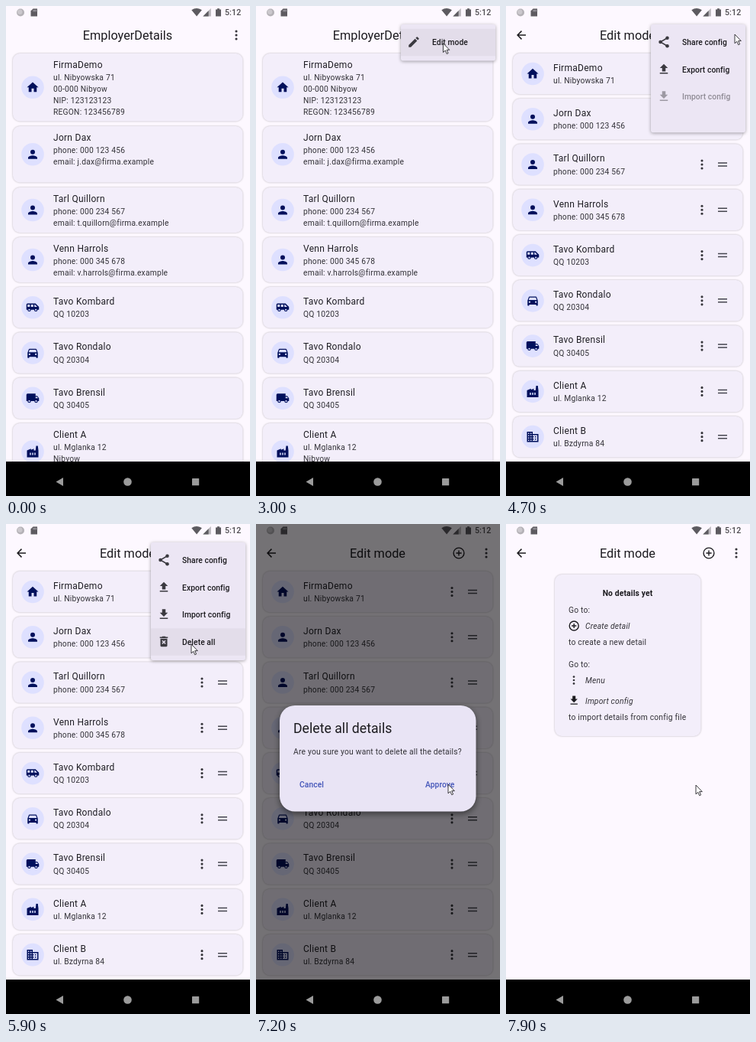
Animation, 320 px wide and 640 px high, one loop 8 s. Source, as an HTML page:

```html
<!DOCTYPE html>
<html lang="en">
<head>
<meta charset="utf-8">
<title>Details list</title>
<style>
  html, body { margin: 0; width: 100%; height: 100%; overflow: hidden; background: #fdf8ff; }
  svg { display: block; width: 100%; height: 100%; }
  text { font-family: Roboto, "Open Sans", sans-serif; font-size: 10.3px; letter-spacing: .2px; fill: #333238; white-space: pre; }
  .title { font-size: 12px; letter-spacing: .28px; fill: #1f1e24; }
  .bar { font-size: 16.3px; letter-spacing: 0; fill: #1c1b1f; text-anchor: middle; }
  .head { font-size: 17.7px; letter-spacing: 0; fill: #1c1b1f; }
  .label { font-weight: 500; letter-spacing: .06px; fill: #1c1b1f; }
  .button { font-weight: 500; letter-spacing: .06px; fill: #4355b9; }
  .bold { font-weight: 700; letter-spacing: .15px; fill: #1c1b1f; text-anchor: middle; }
  .italic { font-style: italic; }
  .clock { font-size: 10.6px; font-weight: 500; letter-spacing: .1px; fill: #4c4a4e; }
  .card { fill: #f3eefa; filter: drop-shadow(0 .8px .8px rgba(0, 0, 0, .27)); }
  .menu { fill: #ece6f4; filter: drop-shadow(0 1.5px 2px rgba(0, 0, 0, .35)); }
  .dialog { fill: #e9e4f5; filter: drop-shadow(0 3px 4px rgba(0, 0, 0, .5)); }
</style>
</head>
<body>
<svg id="stage" viewBox="0 0 320 640"></svg>
<script>
const LOOP = 8000, STEP = 100;
const NS = 'http://www.w3.org/2000/svg';
const stage = document.getElementById('stage');

function el(parent, tag, attrs = {}, content) {
  const node = document.createElementNS(NS, tag);
  for (const k in attrs) node.setAttribute(k, attrs[k]);
  if (content) node.textContent = content;
  return parent.appendChild(node);
}
const group = parent => el(parent, 'g');
const SIZES = { title: 12, bar: 16.3, head: 17.7, clock: 10.6 };

// y is the optical middle of the line
const text = (g, x, y, str, cls = '') =>
  el(g, 'text', { x, y: y + .35 * (SIZES[cls] || 10.3), class: cls }, str);
const rect = (g, x, y, width, height, rx, attrs) =>
  el(g, 'rect', { x, y, width, height, rx, ...attrs });
const circle = (g, cx, cy, r, fill) => el(g, 'circle', { cx, cy, r, fill });
const stroke = (g, d, width, color = '#1c1b1f') =>
  el(g, 'path', { d, fill: 'none', stroke: color, 'stroke-width': width });

const ring = (x, y, r) => `M${x - r} ${y}a${r} ${r} 0 1 0 ${2 * r} 0a${r} ${r} 0 1 0 ${-2 * r} 0z`;
const box = (x, y, w, h) => `M${x} ${y}h${w}v${h}h${-w}z`;
const wheels = (a, b, y) => [a, b].map(x => ring(x, y, 1.5)).join('');
const panes = [4, 8].flatMap(x => [5, 9, 13, 17].map(y => box(x, y, 2, 2))).join('');

const ICONS = {
  home: 'M10 20v-6h4v6h5v-8h3L12 3 2 12h3v8z',
  person: ring(12, 8, 4) + 'M12 14c-2.7 0-8 1.3-8 4v2h16v-2c0-2.7-5.3-4-8-4z',
  shuttle: 'M17 5H3a2 2 0 0 0-2 2v9h2a3 3 0 0 0 6 0h5.5a3 3 0 0 0 6 0H23v-5z'
    + box(3, 7, 4, 4) + box(9, 7, 4, 4) + 'M15 11V7h1l4 4z' + wheels(6, 17.5, 16),
  car: 'M18.9 6q-.4-1-1.4-1h-11q-1 0-1.4 1L3 12v8q0 1 1 1h1q1 0 1-1v-1h12v1q0 1 1 1h1q1 0 1-1v-8z'
    + 'M5 11l1.5-4.5h11L19 11z' + wheels(6.5, 17.5, 14.5),
  truck: 'M20 8h-3V4H3a2 2 0 0 0-2 2v11h2a3 3 0 0 0 6 0h6a3 3 0 0 0 6 0h2v-5z'
    + 'M19.5 9.5l2 2.5H17V9.5z' + wheels(6, 18, 17),
  factory: 'M22 22H2V10l7-3v2l5-2v3h3l1-8h3l1 8z' + [7, 11, 15].map(x => box(x, 14, 2, 4)).join(''),
  offices: 'M12 7V3H2v18h20V7z' + panes + 'M12 9h8v10h-8v-2h2v-2h-2v-2h2v-2h-2z'
    + box(16, 11, 2, 2) + box(16, 15, 2, 2),
  upload: 'M9 16h6v-6h4l-7-7-7 7h4z' + box(5, 18, 14, 2),
  download: 'M19 9h-4V3H9v6H5l7 7z' + box(5, 18, 14, 2),
  trash: 'M6 19q0 2 2 2h8q2 0 2-2V7H6zM15.5 4l-1-1h-5l-1 1H5v2h14V4z'
    + 'M8.5 10.9l1.4-1.4 2.1 2.1 2.1-2.1 1.4 1.4-2.1 2.1 2.1 2.1-1.4 1.4-2.1-2.1-2.1 2.1-1.4-1.4 2.1-2.1z',
  pencil: 'M3 17.2V21h3.8L17.8 9.9l-3.7-3.7zM20.7 7q.6-.7 0-1.4l-2.3-2.3q-.7-.6-1.4 0l-1.8 1.8 3.7 3.7z'
};

function icon(g, name, cx, cy, fill, size = 18) {
  const s = size / 24;
  const at = `translate(${cx - 12 * s} ${cy - 12 * s}) scale(${s})`;
  if (name !== 'share') {
    return el(g, 'path', { d: ICONS[name], fill, 'fill-rule': 'evenodd', transform: at });
  }
  const sub = el(g, 'g', { transform: at });
  stroke(sub, 'M18 5L6 12l12 7', 2, fill);
  [[18, 5], [6, 12], [18, 19]].forEach(([x, y]) => circle(sub, x, y, 3, fill));
}
const dots = (g, x, y, gap = 5, r = 1.55) =>
  [-gap, 0, gap].forEach(d => circle(g, x, y + d, r, '#36353b'));
function plus(g, x, y, r) {
  el(g, 'circle', { cx: x, cy: y, r, fill: 'none', stroke: '#1c1b1f', 'stroke-width': 1.4 });
  stroke(g, `M${x - r * .52} ${y}h${r * 1.04}M${x} ${y - r * .52}v${r * 1.04}`, 1.4);
}

// icon, title, lines, card top, card height
const DETAILS = [
  ['home', 'FirmaDemo', ['ul. Nibyowska 71', '00-000 Nibyow', 'NIP: 123123123', 'REGON: 123456789'], 62, 88.5],
  ['person', 'Jorn Dax', ['phone: 000 123 456', 'email: j.dax@firma.example'], 157, 73.5],
  ['person', 'Tarl Quillorn', ['phone: 000 234 567', 'email: t.quillorn@firma.example'], 237, 59],
  ['person', 'Venn Harrols', ['phone: 000 345 678', 'email: v.harrols@firma.example'], 302, 59],
  ['shuttle', 'Tavo Kombard', ['QQ 10203'], 367, 53.5],
  ['car', 'Tavo Rondalo', ['QQ 20304'], 426.3, 53.5],
  ['truck', 'Tavo Brensil', ['QQ 30405'], 485.6, 53.5],
  ['factory', 'Client A', ['ul. Mglanka 12', 'Nibyow'], 545, 74],
  ['offices', 'Client B', ['ul. Bzdyrna 84']]
];

function page(title, editable) {
  const g = group(stage);
  rect(g, 0, 0, 320, 596, 0, { fill: '#fdf8ff' });
  text(g, 159.5, 38, title, 'bar');
  dots(g, 302, 38);
  if (editable) {
    stroke(g, 'M26 38H15.5M20.5 32.6L15.1 38l5.4 5.4', 1.5);
    plus(g, 266, 38, 6.9);
  }
  return g;
}
function card(g, name, title, lines, top, height) {
  const mid = top + height / 2;
  const y = height < 55 ? mid - 8 : top + 14.3;
  rect(g, 9, top, 301.5, height, 9, { class: 'card' });
  circle(g, 35, mid, 14.8, '#dee0ff');
  icon(g, name, 35, mid, '#00105c');
  text(g, 62, y, title, 'title');
  lines.forEach((line, i) => text(g, 62, y + 17 + i * 14.9, line));
}

const view = page('EmployerDetails', false);
DETAILS.slice(0, 8).forEach(d => card(view, ...d));

const edit = page('Edit mode', true);
DETAILS.forEach(([name, title, lines], i) => {
  const mid = 88.5 + 59.27 * i;
  card(edit, name, title, lines.slice(0, 1), mid - 26.75, 53.5);
  dots(edit, 257, mid);
  stroke(edit, `M278 ${mid - 2}h12M278 ${mid + 2}h12`, 1.5, '#46464f');
});

const empty = page('Edit mode', true);
rect(empty, 64, 66, 191.5, 211, 9, { class: 'card' });
text(empty, 159.5, 90, 'No details yet', 'bold');
text(empty, 82, 112, 'Go to:');
plus(empty, 89.2, 133, 6);
text(empty, 104, 133, 'Create detail', 'italic');
text(empty, 82, 154, 'to create a new detail');
text(empty, 82, 183.5, 'Go to:');
dots(empty, 89, 204, 4.4, 1.35);
text(empty, 104, 204, 'Menu', 'italic');
icon(empty, 'download', 89.2, 230.5, '#1c1b1f', 16);
text(empty, 104, 231, 'Import config', 'italic');
text(empty, 82, 252, 'to import details from config file');

// status bar
const status = group(stage);
circle(status, 19, 8.5, 5, '#b4b1b6');
circle(status, 18.2, 7.8, 3.2, '#cbc8cd');
el(status, 'path', { d: 'M35.5 3.5h5.5v10h-8.5v-7z', fill: '#5d5b60' });
stroke(status, 'M36 5v2.4M37.7 5v2.4M39.4 5v2.4', .8, '#c5c2c8');
el(status, 'path', { d: 'M243.3 5.2Q250 .8 256.9 5.2L250.1 13.6z', fill: '#5d5b60' });
el(status, 'path', { d: 'M258.4 13.5h10.4V3z', fill: '#b9b6bb' });
el(status, 'path', { d: 'M258.4 13.5h7.2V6.3z', fill: '#5d5b60' });
el(status, 'path', { d: 'M277 3.2h3v1.2h2v9.2h-7V4.4h2z', fill: '#5d5b60' });
text(status, 287, 8.6, '5:12', 'clock');

const ROW = 35.5, MENU_TOP = 24, RIGHT = 314, WIDTH = 124;
function menu(items) {
  const g = group(stage), n = items.length;
  const back = rect(g, RIGHT, MENU_TOP, 0, 0, 3, { class: 'menu' });
  const hover = rect(g, RIGHT - WIDTH, 0, WIDTH, ROW, 0);
  const rows = items.map(([name, label], i) => {
    const row = group(g), y = 47.5 + ROW * i;
    icon(row, name, 207, y - .5, '#3b3a40');
    text(row, 231, y, label, 'label');
    return row;
  });
  const unit = 1 / (n + 1.5);
  return (p, [x, y], pressed) => {
    g.style.opacity = clamp(p * 3);
    const w = WIDTH * clamp(p / unit);
    back.setAttribute('x', RIGHT - w);
    back.setAttribute('width', w);
    back.setAttribute('height', (12 + ROW * n) * clamp(p / (unit * n)));
    rows.forEach((row, i) => row.style.opacity = clamp((p / unit - i - 1) / 1.5));
    const over = Math.floor((y - 29.8) / ROW);
    const on = p > .7 && x >= RIGHT - WIDTH && over >= 0 && over < n;
    hover.setAttribute('y', 29.8 + ROW * over);
    hover.style.opacity = on ? (pressed ? .12 : .04) : 0;
  };
}
const clamp = v => Math.max(0, Math.min(1, v));

const viewMenu = menu([['pencil', 'Edit mode']]);
const editMenu = menu([
  ['share', 'Share config'], ['upload', 'Export config'],
  ['download', 'Import config'], ['trash', 'Delete all']
]);

const modal = group(stage);
rect(modal, 0, 0, 320, 596, 0, { fill: '#000', 'fill-opacity': .54 });
rect(modal, 31, 237, 257.5, 138.5, 20, { class: 'dialog' });
text(modal, 49, 266.5, 'Delete all details', 'head');
text(modal, 49, 297, 'Are you sure you want to delete all the details?');
text(modal, 57, 340.3, 'Cancel', 'button');
text(modal, 222, 340.3, 'Approve', 'button');

// navigation bar
rect(stage, 0, 595, 320, 45, 0, { fill: '#000' });
el(stage, 'path', { d: 'M75 616v11l-9.5-5.5z', fill: '#9b9b9b' });
circle(stage, 159.5, 621.5, 5.3, '#9b9b9b');
rect(stage, 244, 617, 9.2, 9.2, .5, { fill: '#9b9b9b' });

const cursor = el(stage, 'path', {
  d: 'M0 0V11.8L2.8 9.3 4.7 13.7 6.6 12.9 4.7 8.6H8.3z',
  fill: '#fff', stroke: '#26252b', 'stroke-width': .9, 'stroke-linejoin': 'round'
});

// tracks: [time, value...]
const POINTER = [
  [1500, 317, 34], [1800, 310, 37], [2100, 301, 38], [2600, 301, 38], [3100, 239, 50],
  [3600, 239, 50], [4100, 292, 37], [4300, 300, 37], [4800, 300, 37], [5400, 243, 157],
  [6400, 243, 157], [7000, 252, 340], [7400, 252, 340], [7700, 249, 341]
];
const VIEW_MENU = [[2300, 0], [2600, 1], [3200, 1], [3400, 0]];
const EDIT_PAGE = [[3200, 0], [3400, 1]];
const EDIT_MENU = [[4500, 0], [4800, 1], [6000, 1], [6100, .8], [6300, 0]];
const MODAL = [[6000, 0], [6100, 1], [7300, 1], [7500, 0]];
const linear = k => k, smooth = k => k * k * (3 - 2 * k);

function at(track, t, ease = linear) {
  const i = track.findIndex(key => key[0] > t);
  if (i === 0) return track[0].slice(1);
  if (i < 0) return track[track.length - 1].slice(1);
  const a = track[i - 1], b = track[i];
  const k = ease((t - a[0]) / (b[0] - a[0]));
  return a.slice(1).map((v, j) => v + (b[j + 1] - v) * k);
}

function render(t) {
  const pos = at(POINTER, t, smooth);
  cursor.setAttribute('transform', `translate(${pos})`);
  cursor.style.opacity = t < 1500 ? 0 : 1;

  const [shown] = at(EDIT_PAGE, t);
  edit.style.opacity = shown;
  const zoom = .92 + .08 * shown;
  edit.setAttribute('transform', `translate(${160 * (1 - zoom)} ${297 * (1 - zoom)}) scale(${zoom})`);
  empty.style.opacity = t >= 7400 ? 1 : 0;

  viewMenu(at(VIEW_MENU, t)[0], pos, t >= 3200);
  editMenu(at(EDIT_MENU, t)[0], pos, t >= 6000);
  modal.style.opacity = at(MODAL, t)[0];
}

const start = performance.now();
function tick() {
  const t = (performance.now() - start) % LOOP;
  render(Math.floor(t / STEP) * STEP);
  requestAnimationFrame(tick);
}
render(0);
requestAnimationFrame(tick);
</script>
</body>
</html>
```
